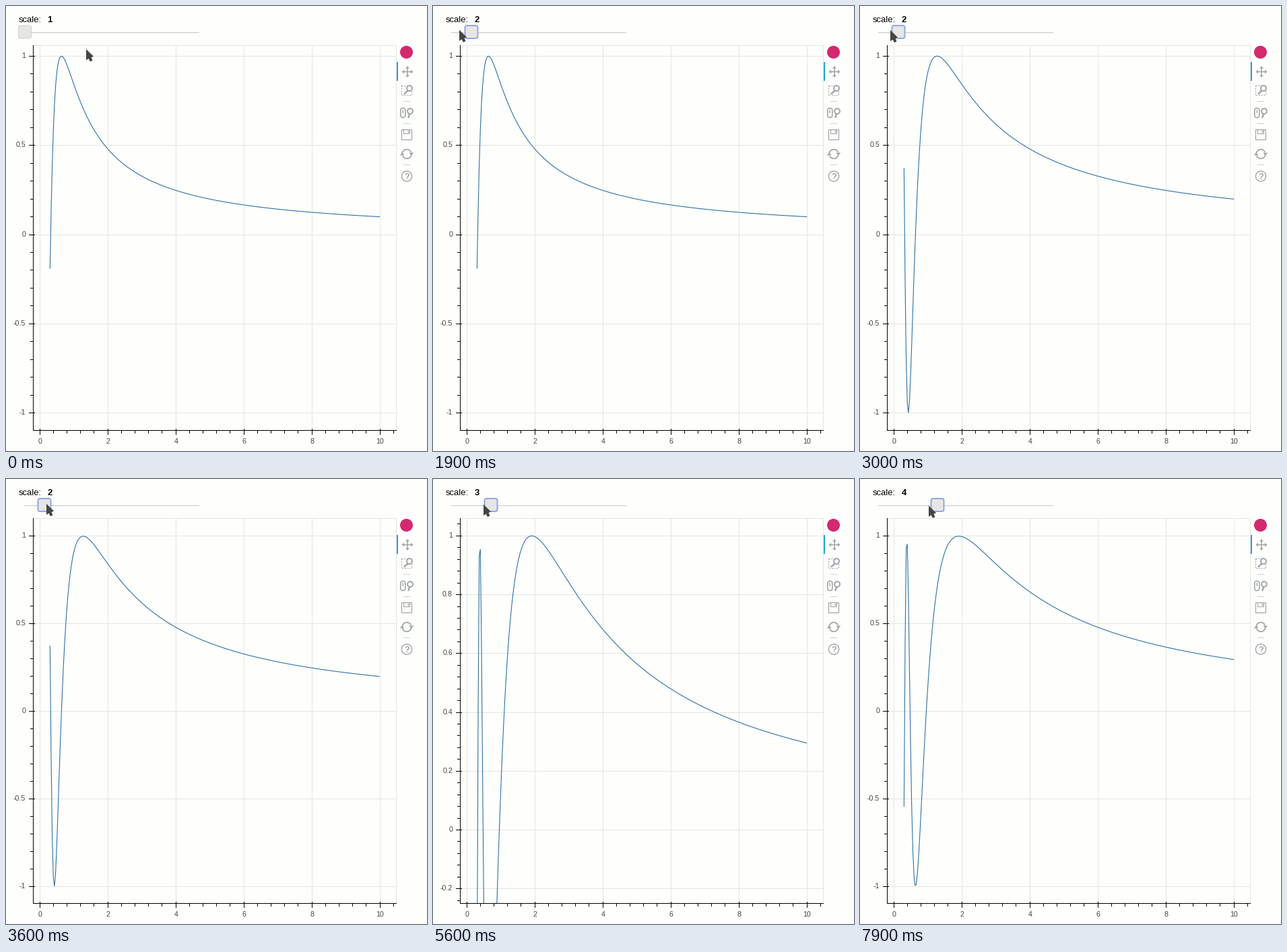
Recreate the animation shown at these times as a matplotlib script. Size 625 by 660 pixels, loop 8000 ms.

```python
import matplotlib.pyplot as plt
import numpy as np
from matplotlib.animation import FuncAnimation
from matplotlib.collections import LineCollection
from matplotlib.patches import Circle, FancyBboxPatch, Polygon, Rectangle

plt.rcParams["path.snap"] = False  # every line is placed on pixel centres here
plt.rcParams["path.simplify"] = False

W, H, DPI = 625, 660, 100
STEP_MS, FRAMES = 100, 80
PT = 72 / DPI  # points per pixel

BG, GRID, BLACK, LABEL = "#fefefc", "#e4e6e0", "#000000", "#444444"
BLUE, ICON, RULE = "#2b6fa6", "#a1a6a9", "#cfd1cd"
LEFT, TOP, RIGHT, BOTTOM = 40.5, 58.5, 579.5, 629.5

fig = plt.figure(figsize=(W / DPI, H / DPI), dpi=DPI, facecolor=BG)
ax = fig.add_axes([0, 0, 1, 1])
ax.set_xlim(0, W)
ax.set_ylim(H, 0)
ax.axis("off")


def line(xs, ys, color=ICON, width=1.0, z=2, cap="butt"):
    return ax.plot(xs, ys, color=color, lw=width * PT, zorder=z,
                   solid_capstyle=cap, solid_joinstyle="miter")[0]


def text(x, y, s, px=10.67, color=LABEL, ha="left", weight="normal"):
    return ax.text(x, y, s, fontsize=px * PT, color=color, ha=ha, va="baseline",
                   weight=weight, family="Liberation Sans", zorder=5)


def shape(points, color=ICON, z=3):
    return ax.add_patch(Polygon(points, closed=True, fc=color, ec="none", zorder=z))


def ring(x, y, r, width):
    ax.add_patch(Circle((x, y), r, fc="none", ec=ICON, lw=width * PT, zorder=3))


def box(x, y, w, h, r, width, dash="-"):
    style = f"round,pad=0,rounding_size={r}"
    return ax.add_patch(FancyBboxPatch((x, y), w, h, boxstyle=style, fc="none", ec=ICON,
                                       lw=width * PT, ls=dash, zorder=3))


def lens(x, y, dx, dy):
    ring(x, y, 4, 1.9)
    line([x + 0.35 * dx, x + dx], [y + 0.45 * dy, y + dy], width=2.5, cap="round")


def segments(color, z):
    return ax.add_collection(LineCollection([], colors=color, linewidths=PT, zorder=z))


# ---- plot frame and x axis ----
UNIT = 50.5  # pixels per x unit

for i in range(27):
    x = 50.5 + np.floor(0.4 * i * UNIT)
    if i % 5:
        line([x, x], [629, 634], BLACK, z=4)
    else:
        line([x, x], [TOP, BOTTOM], GRID, z=1)
        line([x, x], [627, 636], BLACK, z=4)
        text(x, 649, str(2 * i // 5), ha="center")
line([LEFT, RIGHT, RIGHT], [TOP, TOP, BOTTOM], GRID, z=1)
line([LEFT, LEFT], [TOP - 0.5, BOTTOM + 0.5], BLACK, z=4)
line([LEFT - 0.5, RIGHT + 0.5], [BOTTOM, BOTTOM], BLACK, z=4)

grid_y = segments(GRID, 1)
ticks_y = segments(BLACK, 4)
labels_y = [text(29, 0, "", ha="right") for _ in range(7)]

xs = np.linspace(0.3, 10, 300)
curve = line(50.2 + UNIT * xs, xs, BLUE, 1.1, z=3)
curve.set_solid_joinstyle("round")
curve.set_clip_path(Rectangle((LEFT, TOP), RIGHT - LEFT, BOTTOM - TOP,
                              transform=ax.transData))


# ---- toolbar ----
def toolbar():
    ax.add_patch(Circle((594.5, 68.5), 9.5, fc="#d4286f", ec="none", zorder=3))
    line([581, 581], [83, 111], "#26a0d4", 2)
    for y in (141.5, 174.5, 235.5):
        line([590, 600], [y, y], RULE)

    # pan
    center = np.array([596, 97.5])
    for a in np.arange(4) * np.pi / 2:
        out = np.array([np.cos(a), np.sin(a)])
        side = 3 * out[::-1] * (1, -1)
        line(*zip(center, center + 6 * out), width=1.6)
        shape([center + 8.5 * out, center + 5 * out + side, center + 5 * out - side])

    # box zoom
    box(587.5, 118.5, 15, 14, 0.1, 1.1, (0, (1.8, 1.6)))
    lens(599, 122, -7.5, 8)

    # wheel zoom
    box(585.8, 151.5, 7, 14, 3.4, 1.6)
    line([589.3, 589.3], [154, 159], width=1.4)
    lens(600, 156, -2.5, 9)

    # save
    box(587.5, 183.5, 15, 15, 0.6, 1.2)
    box(590.5, 183.5, 9, 6, 0.1, 1.1)
    line([597.5, 597.5], [185, 188], width=1.6)

    # reset
    cx, cy, r = 595, 219.5, 6.8
    for sign in (1, -1):
        a = np.radians(np.linspace(190, 335, 24))
        line(cx + sign * r * np.cos(a), cy + sign * r * np.sin(a), width=1.8)
        x = cx + sign * r
        shape([(x - 3.4, cy - sign * 2), (x + 3.4, cy - sign * 2), (x, cy + sign * 2.4)])

    # help
    ring(595, 252.5, 7.6, 1.4)
    text(595, 257, "?", 12.5, ICON, "center", "bold")


toolbar()

# ---- slider and pointer ----
text(19, 24, "scale:", 13, BLACK)
value = text(61.5, 24, "", 13, BLACK, weight="bold")
line([27, 287], [39.5, 39.5], "#c6c7c4", z=2)
knob = box(0, 0, 19, 19, 3.2, 1)
knob.set(facecolor="#e6e6e5", zorder=6)
pointer = shape([(0, 0)], "#454643", z=8)
ARROW = np.array([(0, 0), (0, 16.5), (3.5, 14), (6, 18.5), (9.5, 16.8), (7.5, 12.3), (11, 10.8)])

# pointer glides: last step, number of steps, x reached
START_X = 119
GLIDES = [(8, 3, 39), (14, 5, 33), (19, 1, 39), (23, 3, 45), (36, 1, 60),
          (47, 2, 68), (53, 1, 75), (68, 3, 83), (75, 1, 96), (79, 2, 102)]

FOCUS = 17               # slider handle gets its focus ring
ADVANCES = (19, 51, 78)  # slider moves on by one
REDRAWS = (26, 56)       # curve follows the slider
REFIT = 4                # steps until the y range fits the new curve
FULL_TOP = 32            # upper end of the range first reaches its final value


def count(n, steps):
    return sum(n >= s for s in steps)


def y_range(n):
    stale = any(0 <= n - s < REFIT for s in REDRAWS)
    lo = -0.2505 if stale else -1.0985
    hi = 1.0585 if stale or n < FULL_TOP else 1.1
    return lo, hi


def draw_plot(scale, lo, hi):
    def px_y(v):
        return 58.3 + (hi - v) * (BOTTOM - TOP) / (hi - lo)

    curve.set_ydata(px_y(np.sin(scale / xs)) + 0.5)

    step = 0.5 if hi - lo > 2 else 0.2
    minor = step / 5
    grid, ticks, majors = [], [], []
    for i in range(int(np.ceil(lo / minor)), int(hi / minor - 1e-6) + 1):
        y = np.round(px_y(i * minor)) + 0.5
        if i % 5:
            ticks.append([(36, y), (41, y)])
        else:
            ticks.append([(34, y), (43, y)])
            grid.append([(LEFT, y), (RIGHT, y)])
            majors.append((y, i // 5 * step))
    grid_y.set_segments(grid)
    ticks_y.set_segments(ticks)

    for label in labels_y:
        label.set_text("")
    for label, (y, v) in zip(labels_y, majors):
        label.set_y(y + 2.5)
        label.set_text(f"{round(v, 2):g}")


def pointer_tip(n):
    x = START_X
    for end, steps, goal in GLIDES:
        x += (goal - x) * np.clip((n - end + steps) / steps, 0, 1)
    # slight drift downwards along the track, after the first approach
    end, steps, _ = GLIDES[0]
    approach = np.clip((end - n) / steps, 0, 1)
    return x, 35 + 0.065 * (x - 33) + 23.4 * approach


def update(n):
    draw_plot(1 + count(n, REDRAWS), *y_range(n))

    moved = count(n, ADVANCES)
    focused = n >= FOCUS
    value.set_text(str(1 + moved))
    knob.set_bounds(18.5 + 29 * moved, 29, 19, 19)
    knob.set_edgecolor("#94a5e4" if focused else "#cfcfcf")
    knob.set_linewidth((2 if focused else 1) * PT)
    pointer.set_xy(ARROW + pointer_tip(n))
    return []


anim = FuncAnimation(fig, update, frames=FRAMES, interval=STEP_MS,
                     init_func=lambda: update(0), repeat=True, repeat_delay=0)
plt.show()
```
